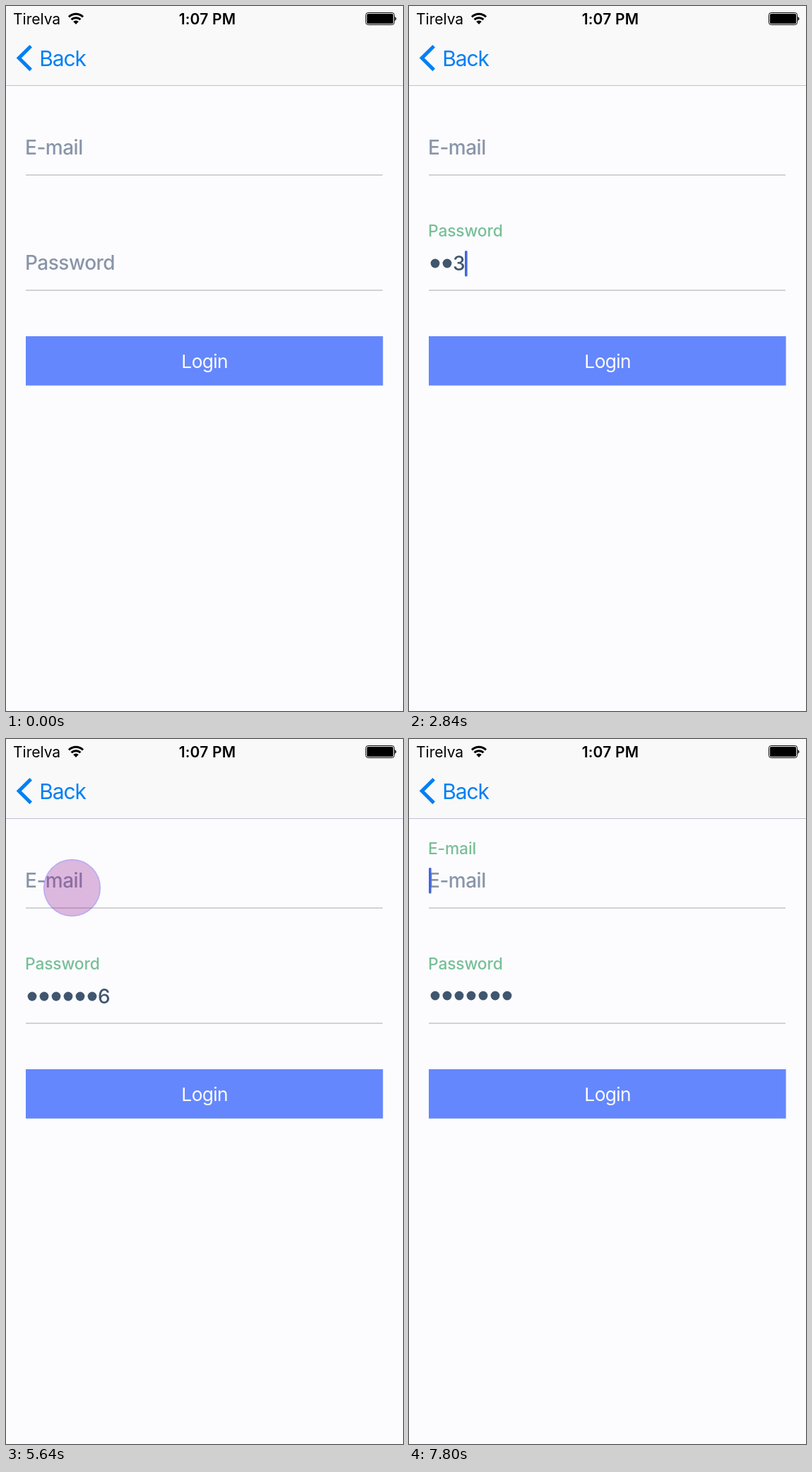
An HTML page for the animation above (8 s loop, 562x997 px).

```html
<!DOCTYPE html>
<html lang="en">
<head>
<meta charset="utf-8">
<title>Login form</title>
<style>
  html, body { margin: 0; width: 100%; height: 100%; overflow: hidden; background: #fcfcfe; }
  svg { display: block; width: 100%; height: 100%; }
  text { font-family: Inter, Roboto, sans-serif; white-space: pre; }
  .status { font-size: 21px; }
  .hint { font-size: 28px; font-weight: 500; letter-spacing: -.5px; fill: #8995a8; }
  .label { font-size: 22.8px; font-weight: 500; letter-spacing: -.15px; fill: #78bf98; }
  #digit { font-size: 28px; font-weight: 500; fill: #40566f; }
  #dots { fill: #40566f; }
</style>
</head>
<body>
<svg viewBox="0 0 562 997">
  <rect width="562" height="997" fill="#fcfcfe"/>
  <rect width="562" height="112" fill="#f9f9f9"/>
  <rect y="112" width="562" height="1" fill="#c3c0d3"/>

  <text class="status" x="10" y="25.5">Tirelva</text>
  <g fill="none" stroke="#000" stroke-width="3">
    <path d="M89 15.5a14 14 0 0 1 20 0M92.6 19.3a9 9 0 0 1 12.8 0"/>
  </g>
  <path d="M99 26l-3.8-4a5.4 5.4 0 0 1 7.6 0z"/>
  <text class="status" x="285" y="25.5" text-anchor="middle" font-weight="600" letter-spacing=".2">1:07 PM</text>
  <rect x="509.5" y="9.5" width="40" height="17" rx="3" fill="none" stroke="#000"/>
  <rect x="511" y="11" width="37" height="14" rx="1.6"/>
  <path d="M550.5 15q2 .8 2 3t-2 3z"/>

  <path d="M35.2 56.8L18.2 73.6l17 16.8" fill="none" stroke="#007ff5" stroke-width="5"/>
  <text x="47.3" y="84.5" font-size="29.9" letter-spacing="-1.1" fill="#007ff5">Back</text>

  <path d="M28 239H533M28 402H533" stroke="#d2d2d4" stroke-width="1.8"/>
  <rect x="28" y="467" width="505.6" height="69.7" fill="#6487fd"/>
  <text x="281.2" y="511.5" font-size="26.3" letter-spacing="-.6" text-anchor="middle" fill="#fcfcfe">Login</text>

  <text class="label" id="mailLabel" x="27" y="162.5">E-mail</text>
  <text class="hint" x="27" y="210">E-mail</text>
  <text class="label" id="passLabel" x="27" y="326">Password</text>
  <text class="hint" id="passHint" x="27" y="373">Password</text>
  <g id="dots"></g>
  <text id="digit" y="374"></text>
  <rect id="caret" width="3.6" rx="1.5" fill="#4169dc"/>
  <circle id="touch" fill="rgb(147,25,147)" fill-opacity=".3" stroke="#6470ff" stroke-opacity=".4" stroke-width="1.5"/>
</svg>
<script>
const LOOP = 8000, STEP = 40, FADE = 230, PITCH = 17;
const SECRET = '1234556';
const KEYS = [2600, 2680, 2840, 3040, 3320, 3320, 3600];
const TAPS = [
  { down: 1440, up: 1645, x: 105.5, y: 368.5 },
  { down: 5520, up: 5685, x: 93.5, y: 210.5 }
];
// caret opacity: [start, end, from, to]
const BLINKS = [
  [1680, 1680, 0, 1], [2120, 2360, 1, 0], [2600, 2600, 0, 1],
  [4040, 4340, 1, 0], [4560, 4720, 0, 1], [5080, 5320, 1, 0],
  [5685, 5685, 0, 1], [6120, 6400, 1, 0], [6640, 6800, 0, 1],
  [7160, 7400, 1, 0], [7640, 7800, 0, 1]
];

const el = id => document.getElementById(id);
const set = (node, attrs) => { for (const k in attrs) node.setAttribute(k, attrs[k]); };
const ramp = (t, a, b) => t >= b ? 1 : t <= a ? 0 : (t - a) / (b - a);
const ease = p => p * p * (3 - 2 * p);
const fade = (t, start) => ease(ramp(t, start, start + FADE));

const dots = [...SECRET].map((_, i) => {
  const dot = document.createElementNS('http://www.w3.org/2000/svg', 'circle');
  set(dot, { cx: 37 + PITCH * i, r: 6.4 });
  return el('dots').appendChild(dot);
});

function drawTouch(t) {
  const tap = TAPS.find(p => t >= p.down && t < p.up + FADE);
  if (!tap) return set(el('touch'), { opacity: 0 });
  const e = fade(t, tap.up);
  set(el('touch'), { cx: tap.x, cy: tap.y, r: 40 + 40 * e, opacity: (1 - e) ** 2 });
}

function drawPassword(t, masked) {
  const count = KEYS.filter(k => t >= k).length;
  const shown = masked ? count : count - 1;
  dots.forEach((dot, i) => set(dot, { cy: masked ? 363 : 364, opacity: +(i < shown) }));
  el('digit').textContent = masked || !count ? '' : SECRET[count - 1];
  set(el('digit'), { x: 28 + PITCH * (count - 1) });
  set(el('passHint'), { opacity: +!count });
  return count;
}

function drawCaret(t, count, onMail) {
  let alpha = 0;
  for (const [a, b, from, to] of BLINKS)
    if (t >= a) alpha = from + (to - from) * ramp(t, a, b);
  set(el('caret'), {
    x: onMail ? 28 : 28 + PITCH * count,
    y: onMail ? 182 : count ? 346 : 345,
    height: onMail || count ? 36.5 : 33.5,
    opacity: alpha
  });
}

function draw(now) {
  const t = Math.floor(now % LOOP / STEP) * STEP;
  const onMail = t >= TAPS[1].up;
  set(el('passLabel'), { opacity: fade(t, TAPS[0].up) });
  set(el('mailLabel'), { opacity: fade(t, TAPS[1].up) });
  drawCaret(t, drawPassword(t, onMail), onMail);
  drawTouch(t);
}

const begin = performance.now();
function tick() {
  draw(performance.now() - begin);
  requestAnimationFrame(tick);
}
tick();
</script>
</body>
</html>
```
